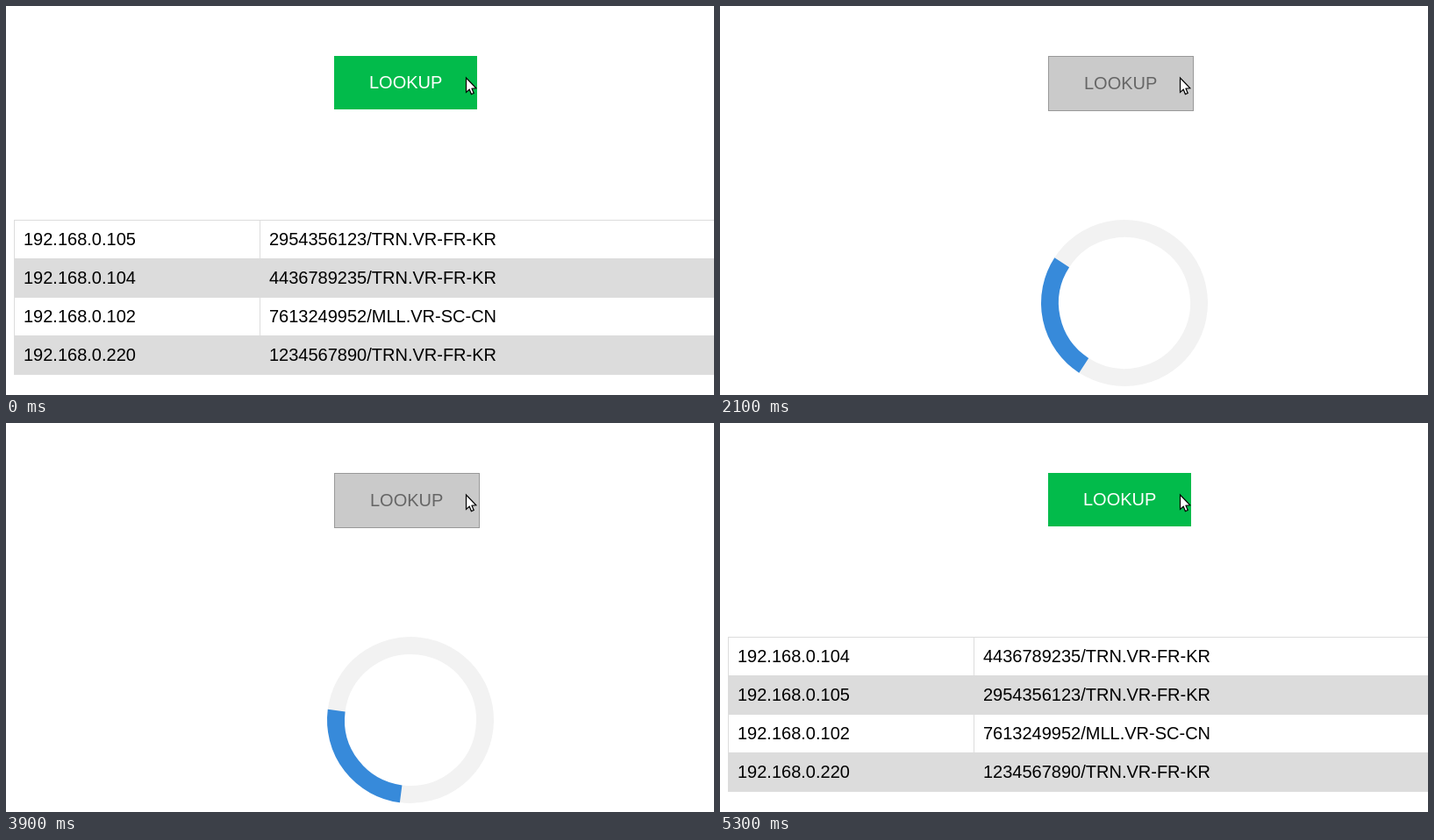
An HTML page with a canvas that plays this animation: 807 px wide and 444 px high, repeating every 8000 ms.

```html
<!DOCTYPE html>
<html lang="en">
<head>
<meta charset="utf-8">
<title>Lookup</title>
<style>
  html, body { margin: 0; width: 100%; height: 100%; overflow: hidden; background: #fff; }
  canvas { display: block; }
</style>
</head>
<body>
<canvas id="stage" width="807" height="444"></canvas>
<script>
const ctx = document.getElementById('stage').getContext('2d');
const LOOP = 8000, STEP = 100;
const BUSY_FROM = 500, BUSY_TO = 5300;
const GRAY = '#dcdcdc';

const DEVICES = {
  '192.168.0.105': '2954356123/TRN.VR-FR-KR',
  '192.168.0.104': '4436789235/TRN.VR-FR-KR',
  '192.168.0.102': '7613249952/MLL.VR-SC-CN',
  '192.168.0.220': '1234567890/TRN.VR-FR-KR'
};
const BEFORE = Object.keys(DEVICES);
const AFTER = [BEFORE[1], BEFORE[0], ...BEFORE.slice(2)];

// The spinner turns about 180 degrees a second; [ms, degrees] where its pace shifts
const PACE = [[500, -135], [1200, -30], [2100, 123], [2200, 156],
              [2700, 246], [3500, 384], [4400, 549], [5000, 654]];

function rect(x, y, w, h, color) {
  ctx.fillStyle = color;
  ctx.fillRect(x, y, w, h);
}

function text(str, x, y, color) {
  ctx.font = '20px "Liberation Sans", Arial, sans-serif';
  ctx.fillStyle = color;
  ctx.fillText(str, x, y);
}

function spinAngle(t) {
  const i = PACE.findIndex(key => key[0] >= t);
  if (i < 0) return PACE[PACE.length - 1][1];
  const [t1, a1] = PACE[i], [t0, a0] = PACE[i - 1] || [0, a1];
  return a0 + (a1 - a0) * (t - t0) / (t1 - t0);
}

function arc(from, sweep, color) {
  const rad = Math.PI / 180;
  ctx.beginPath();
  ctx.arc(461, 339, 85, from * rad, (from + sweep) * rad);
  ctx.lineWidth = 20;
  ctx.strokeStyle = color;
  ctx.stroke();
}

function drawSpinner(t) {
  const angle = spinAngle(t);
  arc(angle + 89.5, 271, '#f2f2f2');
  arc(angle, 90, '#378ada');
}

function drawButton(busy) {
  if (busy) {
    rect(374, 57, 166, 63, '#999');
    rect(375, 58, 164, 61, '#cacaca');
    text('LOOKUP', 415, 95, '#666');
  } else {
    rect(374, 57, 163, 61, '#02bb4b');
    text('LOOKUP', 414, 94, '#fff');
  }
}

function drawTable(hosts) {
  rect(9, 244, 798, 1, GRAY);
  rect(9, 244, 1, 177, GRAY);
  rect(289, 244, 1, 177, GRAY);
  hosts.forEach((ip, i) => {
    const y = 244 + i * 44;
    if (i % 2) rect(9, y, 798, 45, GRAY);
    text(ip, 20, y + 29, '#000');
    text(DEVICES[ip], 300, y + 29, '#000');
  });
}

function drawCursor() {
  const arrow = new Path2D('M524.5 82V98.5L528.2 95.2L530.4 100.6L533.2 99.5L531 94.2L535.8 93.8Z');
  ctx.fillStyle = '#fff';
  ctx.fill(arrow);
  ctx.lineWidth = 1.2;
  ctx.strokeStyle = '#000';
  ctx.stroke(arrow);
}

function draw(now) {
  const t = Math.floor((now % LOOP) / STEP) * STEP;
  const busy = t >= BUSY_FROM && t < BUSY_TO;
  rect(0, 0, 807, 444, '#fff');
  drawButton(busy);
  if (busy) drawSpinner(t);
  else drawTable(t < BUSY_FROM ? BEFORE : AFTER);
  drawCursor();
}

let start;
function tick(now) {
  if (start === undefined) start = now;
  draw(now - start);
  requestAnimationFrame(tick);
}
draw(0);
requestAnimationFrame(tick);
</script>
</body>
</html>
```
